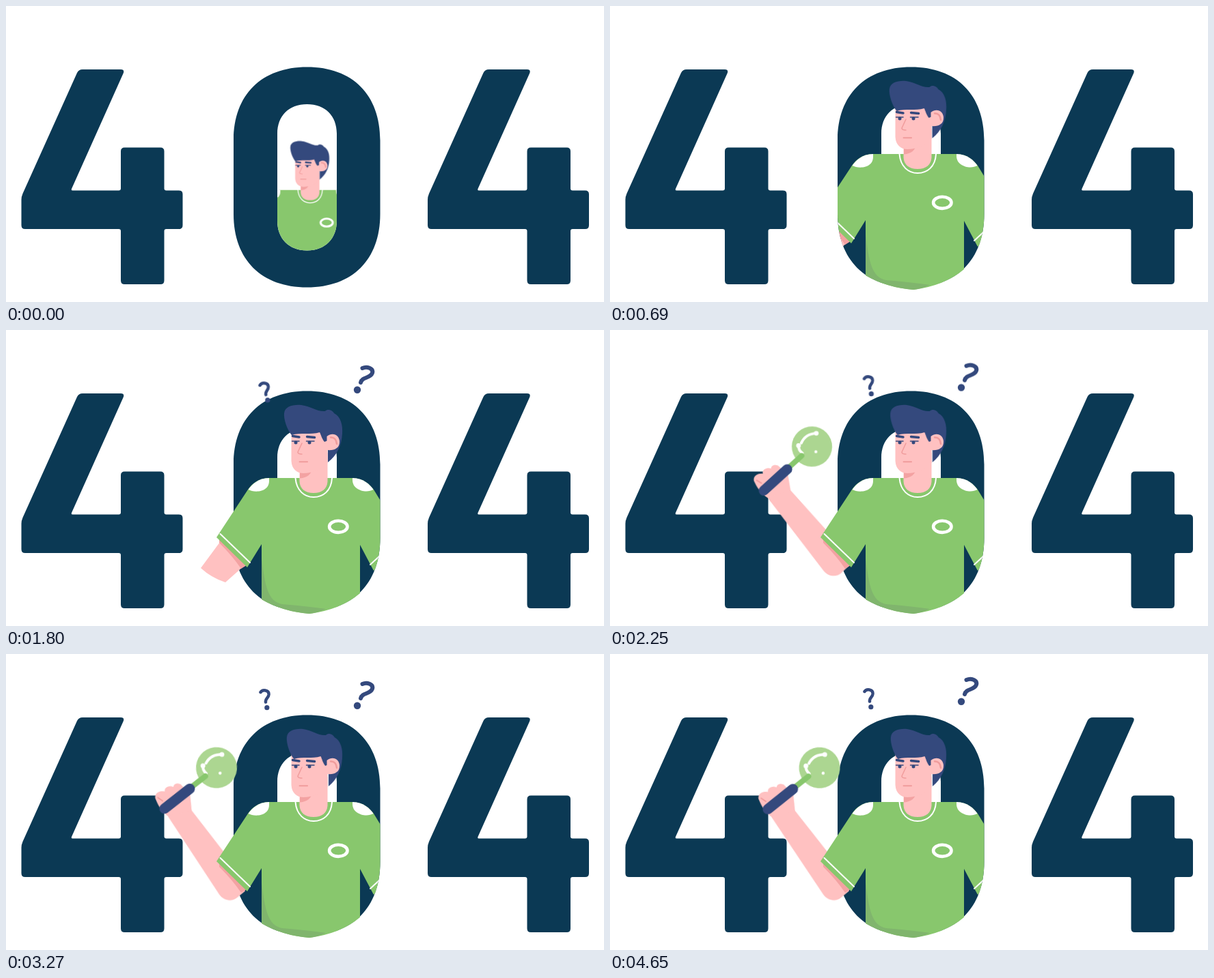
Recreate the animation shown at these times as an HTML page. Size 875 px wide and 434 px high, loop 4680 ms.

```html
<!DOCTYPE html>
<html lang="en">
<head>
<meta charset="utf-8">
<title>404</title>
<style>
  html, body { margin: 0; width: 100%; height: 100%; overflow: hidden; background: #fff; }
  svg { display: block; width: 100%; height: 100%; }

  .navy { fill: #0b3954; }
  .hair { fill: #34497d; }
  .skin { fill: #ffc1c1; }
  .blush { fill: #f3a2a2; }
  .green { fill: #88c76d; }
  .line { fill: none; stroke-linecap: round; stroke-linejoin: round; }
  .ink { stroke: #34497d; }
  .rose { stroke: #f09c9c; }
  .white { stroke: #fff; }

  .anim { animation: 4680ms linear infinite; }
  #zero { animation-name: stretch; transform-origin: 440px 412.5px; animation-timing-function: ease-in-out; }
  #man { animation-name: grow; transform-origin: 434.5px 377px; }
  #window { animation-name: open; }
  #side { animation-name: reveal; transform-origin: 374px 300px; }
  #head { animation-name: look; animation-timing-function: step-end; }
  #quiff { animation-name: quiff; transform-origin: 492px 150px; animation-timing-function: ease-in-out; }
  #stub { animation-name: hide; animation-timing-function: step-end; }
  #forearm { animation-name: raise; transform-origin: 324px 346px; animation-timing-function: ease-in-out; }
  #askL { animation-name: askL; transform-origin: 379px 62px; }
  #askR { animation-name: askR; transform-origin: 524px 57px; }

  @keyframes stretch {
    0%, 11.54%, 100% { transform: none; }
    6.41% { transform: skewX(.8deg) scaleY(1.0325); }
  }
  @keyframes grow {
    0% { transform: scale(.67); animation-timing-function: ease-in-out; }
    5.77%, 100% { transform: none; }
  }
  @keyframes open {
    0% {
      d: path("M397 187C397 161 414 144 440.5 144C467 144 484 161 484 187V315C484 341 467 358.5 440.5 358.5C414 358.5 397 341 397 315Z");
      animation-timing-function: ease-in-out;
    }
    5.77%, 100% {
      d: path("M333 197C333 130 374 89.5 440.5 89.5C507 89.5 547.5 130 547.5 197V305C547.5 372 507 417 440.5 417C374 417 333 372 333 305Z");
    }
  }
  @keyframes reveal {
    0%, 33.33% { transform: scaleX(0); }
    37.18%, 100% { transform: none; }
  }
  @keyframes look {
    0%, 32.05%, 100% { transform: none; }
    15.38% { transform: translate(895px, -2px) scaleX(-1); }
  }
  @keyframes quiff {
    0%, 10%, 38.46% { transform: none; }
    20%, 28%, 52%, 100% { transform: scaleX(.955); }
  }
  @keyframes hide {
    0% { visibility: visible; }
    40.38%, 100% { visibility: hidden; }
  }
  @keyframes raise {
    0%, 40.37% { transform: rotate(-75deg) scale(.3); visibility: hidden; }
    40.38% { transform: rotate(-75deg) scale(.3); visibility: visible; }
    49% { transform: rotate(3deg); }
    54%, 58.97% { transform: none; }
    70.51% { transform: rotate(5.5deg); }
    82.05% { transform: rotate(-.3deg); }
    95.5% { transform: rotate(5.5deg); }
    99.36%, 100% { transform: rotate(5deg); visibility: visible; }
  }
  @keyframes askL {
    0%, 32% { transform: translateY(40px) scale(0); }
    35.5% { transform: translateY(33px) rotate(-6deg) scale(1.05); }
    38.46% { transform: translateY(29.5px) rotate(-5deg); }
    58.97% { transform: translateY(9.5px); }
    82.05% { transform: none; }
    99.36%, 100% { transform: translateY(4px); }
  }
  @keyframes askR {
    0%, 30.8% { transform: translateY(22px) scale(0); }
    34.6% { transform: translateY(16px) scale(1.05); }
    38.46% { transform: translateY(16px); }
    46.15% { transform: translateY(13.5px); }
    58.97% { transform: translateY(7.5px); }
    82.05% { transform: none; }
    92.3% { transform: translateY(-3px); }
    99.36%, 100% { transform: translateY(-2px); }
  }
</style>
</head>
<body>
<svg viewBox="0 0 875 434">
  <defs>
    <path id="four" class="navy" d="M112 93H168Q174 93 171.5 99L96 268Q95 270.5 97.5 270.5H165Q168 270.5 168 267.5V213Q168 207.5 173.5 207.5H226Q231.5 207.5 231.5 213V267.5Q231.5 270.5 234.5 270.5H253Q258.5 270.5 258.5 276V321.5Q258.5 327 253 327H234.5Q231.5 327 231.5 330V402.5Q231.5 408 226 408H173.5Q168 408 168 402.5V330Q168 327 165 327H28Q22.5 327 22.5 321.5V284Q22.5 279.5 24.5 275L104 98Q106.5 93 112 93Z"/>
    <clipPath id="frame">
      <path id="window" class="anim" d="M333 197C333 130 374 89.5 440.5 89.5C507 89.5 547.5 130 547.5 197V305C547.5 372 507 417 440.5 417C374 417 333 372 333 305Z"/>
      <rect id="side" class="anim" x="280" y="225" width="94" height="150"/>
    </clipPath>
  </defs>

  <use href="#four"/>
  <use href="#four" x="594.5"/>
  <path id="zero" class="navy anim" fill-rule="evenodd" d="M333 197C333 130 374 89.5 440.5 89.5C507 89.5 547.5 130 547.5 197V305C547.5 372 507 412.5 440.5 412.5C374 412.5 333 372 333 305ZM397 187V315C397 341 414 358.5 440.5 358.5C467 358.5 484 341 484 315V187C484 161 467 144 440.5 144C414 144 397 161 397 187Z"/>

  <g id="forearm" class="anim">
    <path class="skin" d="M224 243L313 354C320 362 332 363 339 356L350 345L320 298L260 234Z"/>
    <path class="skin" d="M206 222C204 214 213 210 219 211C217 204 226 201 231 203C231 197 240 196 243 200L256 210L261 236L226 246C216 240 210 230 206 222Z"/>
    <path class="line rose" stroke-width="2" d="M210 221L217 225"/>
    <circle cx="291" cy="169" r="30" fill="#acd691"/>
    <g class="line white">
      <path stroke-width="4" d="M277 179Q271 175 271 168M275 164Q281 150 297 149"/>
    </g>
    <g fill="#fff">
      <circle cx="271" cy="168" r="3.5"/>
      <circle cx="297" cy="149" r="3.5"/>
      <circle cx="297" cy="176.5" r="2.2"/>
    </g>
    <path class="line" stroke="#88c76d" stroke-width="8" d="M256 202L276 183"/>
    <path class="line ink" stroke-width="15" d="M221 236L255 203.5"/>
  </g>

  <g clip-path="url(#frame)">
    <g id="man" class="anim">
      <path id="stub" class="skin anim" d="M313 311L285 349Q300 363 321 370L348 346Z"/>
      <path class="blush" d="M312 306L352 345L344 350Q332 332 312 312Z"/>
      <path class="green" d="M385 217H507C523 217 533 227 538 234L582 306L538 353L518 315V386Q490 410 444 416Q405 413 374 395V314L353 348L308 304L354 234C360 225 370 217 385 217Z"/>
      <path fill="#80b56d" d="M374 335C379 375 383 398 404 402Q440 405 468 409Q455 415 444 416Q405 413 374 395Z"/>
      <g fill="#fff">
        <path d="M385 217C370 217 360 226 354.500 234C364 239 385 238 385 221Z"/>
        <path d="M507 217C523 217 533 227 537.500 234C527 240 507 235 507 220Z"/>
      </g>
      <g class="line white" stroke-width="2">
        <path d="M313.500 299L357 341M533 344L560 319"/>
        <path d="M423.500 217C425 236 437 245 450 245C464 245 476 236 477 217"/>
        <ellipse cx="486.300" cy="288.300" rx="13.200" ry="8.600" stroke-width="4.600"/>
      </g>
      <path class="skin" d="M429.500 190V222C430 233 438 239 450 239C462 239 470 233 470.500 222V180H440Z"/>

      <g id="head" class="anim">
        <path class="blush" d="M430 207L448 203Q446 216 430 217.500Z"/>
        <path class="skin" d="M417.500 146V192C418 204 426 210 435 210C449 210 458 205 470.500 195V146Z"/>
        <path id="quiff" class="hair anim" d="M418 154C411 146 406 130 407 122C408 112 420 109 432 110C447 112 455 120 467 119C471 115 478 118 480 122C490 127 493 140 492 152C491 170 484 184 471 194V162L466 164C462 159 461 154 459 150C446 154 431 150 418 154Z"/>
        <path class="skin" d="M469.500 156C478 149 488 154 488 164C488 173 481 177 469.500 176Z"/>
        <g class="line rose">
          <path stroke-width="2.500" d="M475 157.500Q483 157 484 167"/>
          <path stroke-width="1.500" d="M433 166L427 179Q427 182 433 182"/>
          <path stroke-width="2" d="M429.500 193.300H441"/>
        </g>
        <g class="line ink">
          <path stroke-width="3.500" d="M419.500 155.500L429 157M440.500 156.500L451.500 157.500"/>
          <path stroke-width="1.500" d="M418.500 163H429M439.500 163H451"/>
        </g>
        <g class="hair">
          <circle cx="424" cy="165" r="2.500"/>
          <circle cx="444" cy="165" r="2.500"/>
        </g>
      </g>
    </g>
  </g>

  <g id="askL" class="anim">
    <path class="line ink" stroke-width="4.500" d="M372.500 51C375 47 385 47 384.500 54.500C384 60 379 60 380 65.500"/>
    <circle class="hair" cx="381.800" cy="73.700" r="3.600"/>
  </g>
  <g id="askR" class="anim">
    <path class="line ink" stroke-width="6" d="M521.500 40C528 37 538 40 536 47C533 55.500 521 52 519 61"/>
    <circle class="hair" cx="514" cy="71.800" r="5.200"/>
  </g>
</svg>
</body>
</html>
```
